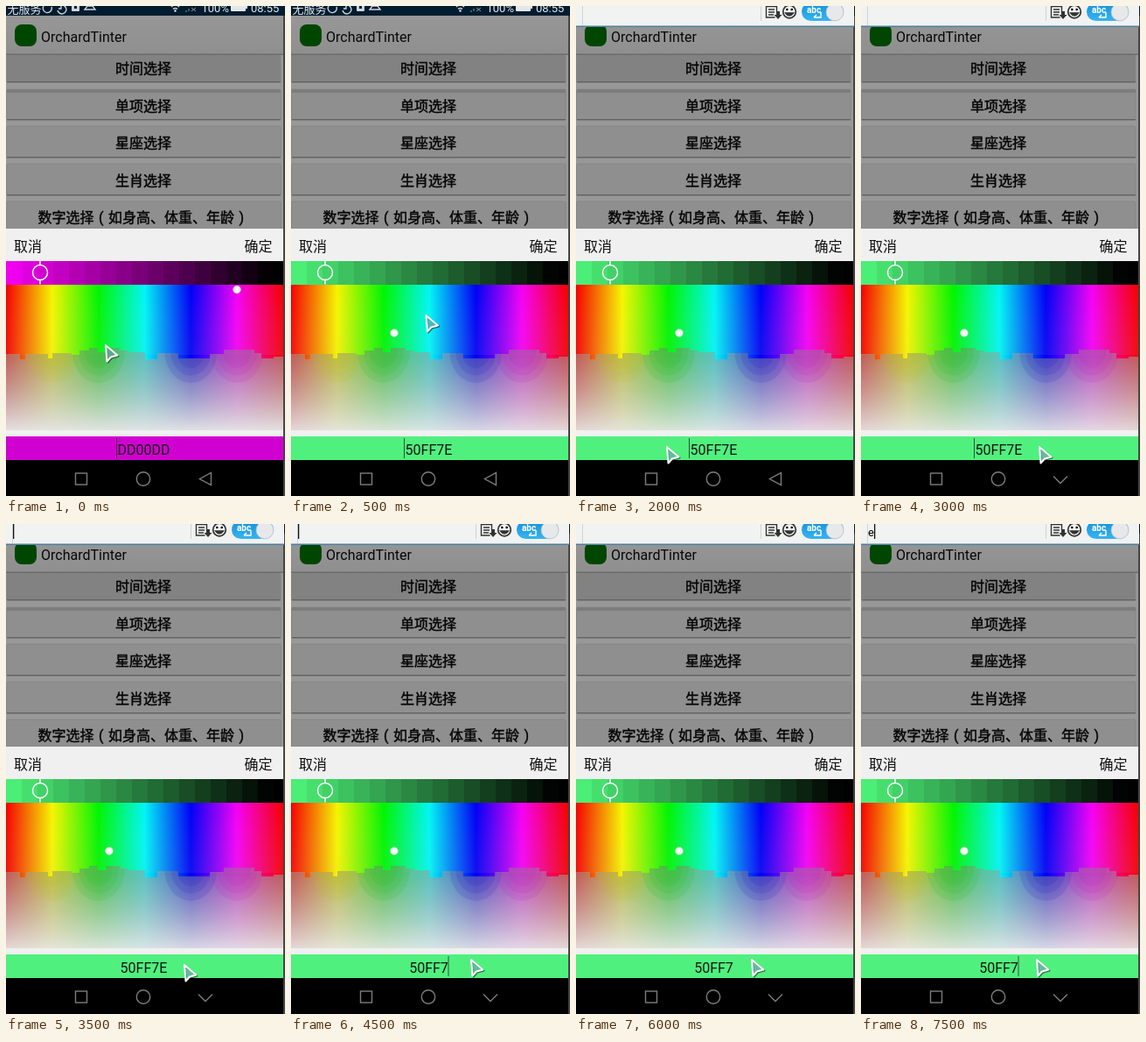
An HTML page that plays this animation: 319 by 559 pixels, repeating every 8 s.

```html
<!DOCTYPE html>
<html lang="zh">
<head>
<meta charset="utf-8">
<title>Colour picker</title>
<style>
  html, body { margin: 0; width: 100%; height: 100%; overflow: hidden; background: #000; }
  svg { display: block; width: 319px; height: 559px; }
  text { font-family: Roboto, "Noto Sans CJK SC", "Noto Sans CJK", sans-serif; font-size: 16px; }
  .mid { text-anchor: middle; }
  .row { fill: #050505; stroke: #050505; stroke-width: .45; }
  .status text { font-size: 13px; fill: #e8edf0; }
  .line { fill: none; stroke-width: 1.4; }
</style>
</head>
<body>
<svg viewBox="0 0 319 559" xmlns="http://www.w3.org/2000/svg">
  <defs>
    <linearGradient id="hue"></linearGradient>
    <linearGradient id="fadeTop" x2="0" y2="1">
      <stop offset="0" stop-color="#fff" stop-opacity="0"/>
      <stop offset="1" stop-color="#ccc" stop-opacity=".08"/>
    </linearGradient>
    <linearGradient id="fadeLow" gradientUnits="userSpaceOnUse" x1="0" x2="0" y1="391" y2="484">
      <stop offset="0" stop-color="#989898" stop-opacity=".56"/>
      <stop offset=".5" stop-color="#bcbcbc" stop-opacity=".77"/>
      <stop offset="1" stop-color="#e4e4e4" stop-opacity=".98"/>
    </linearGradient>
    <clipPath id="low"><path id="lowEdge"/></clipPath>
    <linearGradient id="bar" x2="0" y2="1">
      <stop offset="0" stop-color="#979797"/>
      <stop offset="1" stop-color="#8f8f8f"/>
    </linearGradient>
    <linearGradient id="pill" x2="0" y2="1">
      <stop offset="0" stop-color="#1690d8"/>
      <stop offset="1" stop-color="#38b4f2"/>
    </linearGradient>
  </defs>

  <!-- dimmed page -->
  <rect width="319" height="559" fill="#989898"/>
  <rect y="11" width="317" height="44" fill="url(#bar)"/>
  <rect x="10" y="21" width="25" height="25" rx="8" fill="#004600"/>
  <text x="40" y="40.5" fill="#080808">OrchardTinter</text>
  <g id="rows"></g>
  <rect y="54.5" width="317" height="1.5" fill="#6c6c6c"/>
  <rect x="317" y="11" width="2" height="548" fill="#444"/>

  <!-- status bar -->
  <g class="status">
    <rect width="319" height="11" fill="#021c30"/>
    <text x="1.5" y="7.5">无服务</text>
    <g class="line" stroke="#cfd6da">
      <path d="M43 0a5 5 0 1 0 9 1M59 5a5 5 0 1 0 4-6v4h-3M90 4h12l-3-4h-6z"/>
      <path d="M189 1q4.500-4 9 0M191 3.500q2.500-2 5 0"/>
      <path d="M205 6h2M209 6v-3M212 2l5 4M217 2l-5 4" stroke="#8d989f" stroke-width="1"/>
    </g>
    <rect x="75" y="-4" width="9" height="10" rx="1" fill="#cfd6da"/>
    <rect x="78" y="0" width="3" height="3" fill="#021c30"/>
    <circle cx="193.500" cy="5.500" r="1.200" fill="#e8edf0"/>
    <text x="223.500" y="7">100%</text>
    <rect x="257" y="-4" width="17" height="10" rx="1" fill="#e4e8ea"/>
    <rect x="274" y="-1" width="2" height="4" fill="#e4e8ea"/>
    <text x="280" y="7">08:55</text>
  </g>

  <!-- input bar -->
  <g id="ime">
    <rect width="318" height="24" fill="#f1f2f2"/>
    <rect y="22.500" width="318" height="1.500" fill="#4a80a0"/>
    <path d="M7.500 0v22M211.500 0v17" stroke="#d2d2d2"/>
    <text id="typed" x="8" y="14" style="font-size:13px"></text>
    <rect id="imeCaret" y="0" width="1.300" height="17" fill="#111"/>
    <g class="line" stroke="#333">
      <path d="M217.500 0v13h10M217 .5h12.500v6M220 4h7M220 7h7M220 10h6"/>
      <circle cx="244" cy="6.500" r="7.300" stroke-width="1.700"/>
      <path d="M239.500 8q4.500 6 9 0z" fill="#333"/>
    </g>
    <path d="M229 6h4v4h2.500l-4.500 5-4.500-5h2.500z" fill="#333"/>
    <circle cx="241.300" cy="4" r="1.300"/><circle cx="246.700" cy="4" r="1.300"/>
    <rect x="258" y="-4" width="48" height="21" rx="10.500" fill="url(#pill)"/>
    <text x="264" y="8" fill="#fff" style="font-size:10px;font-weight:700">abc</text>
    <path d="M272 13h8v-6M275 10l-3 3" class="line" stroke="#fff"/>
    <circle cx="296" cy="7" r="10" fill="#e6e8ea" stroke="#b9c2c8" stroke-width=".8"/>
  </g>

  <!-- picker -->
  <rect y="254" width="317" height="264" fill="#f0f0f0"/>
  <text x="9" y="279.500" fill="#111">取消</text>
  <text x="272.500" y="279.500" fill="#111">确定</text>
  <g id="strip"></g>
  <g fill="none" stroke="#fff" stroke-width="1.500">
    <circle cx="39" cy="304" r="8.500"/>
    <path d="M39 291v4.500M39 312.500v5"/>
  </g>
  <rect y="318" width="317" height="166" fill="url(#hue)"/>
  <rect y="318" width="317" height="80" fill="url(#fadeTop)"/>
  <g clip-path="url(#low)">
    <rect id="haze" y="385" width="317" height="99" fill="url(#fadeLow)"/>
    <g id="glows"></g>
  </g>
  <circle id="dot" r="4.300" fill="#fff" fill-opacity=".95" stroke="#ddd" stroke-width=".6"/>
  <rect id="field" y="491" width="317" height="27"/>
  <text id="hex" class="mid" x="157.500" y="511.500" fill="#151515"></text>
  <rect id="caret" y="493" width="1" height="23" fill="#222" fill-opacity=".75"/>

  <!-- navigation -->
  <rect y="518" width="317" height="41" fill="#000"/>
  <g class="line" stroke="#7c7c7c">
    <rect x="79.500" y="533" width="13" height="13"/>
    <circle cx="157" cy="539.500" r="7.700"/>
    <path id="back"/>
  </g>

  <path id="mouse" d="M0 0L1.500 18.500L6 13.500L13.500 11.500Z" fill="#8cc8d7" fill-opacity=".5"
        stroke="#fff" stroke-width="2" stroke-linejoin="round"
        style="filter:drop-shadow(1px 1px .5px #0008)"/>
</svg>

<script>
const $ = id => document.getElementById(id);
const NS = 'http://www.w3.org/2000/svg';
const add = (parent, tag, attrs, text = '') => {
  const el = document.createElementNS(NS, tag);
  set(el, attrs);
  el.textContent = text;
  parent.append(el);
  return el;
};
function set(el, attrs) {
  for (const k in attrs) el.setAttribute(k, attrs[k]);
}
const show = (id, on) => $(id).style.display = on ? '' : 'none';

// list buttons: top, bottom, label baseline, label
[
  [56, 87, 76.5, '时间选择'],
  [95, 130, 119.5, '单项选择'],
  [137, 173, 162, '星座选择'],
  [180, 216, 204.5, '生肖选择'],
  [223, 256, 247, '数字选择\u2004(\u2004如身高、体重、年龄\u2004)\u2004']
].forEach(([top, end, base, label], i) => {
  const rows = $('rows');
  add(rows, 'rect', { x: 0.5, y: top, width: 313.5, height: end - top, rx: 1.5,
    fill: i ? '#8f8f8f' : '#828282', stroke: '#858585', 'stroke-width': 0.8 });
  if (i === 1) add(rows, 'rect', { x: 1, y: 95, width: 313, height: 4, fill: '#7d7d7d' });
  add(rows, 'rect', { x: 1, y: end - 1, width: 313, height: 1.3, fill: '#616161' });
  add(rows, 'text', { x: 157, y: base, class: 'mid row' }, label);
});

for (let i = 0; i <= 6; i++)
  add($('hue'), 'stop', { offset: i / 6, 'stop-color': `hsl(${i * 60} 100% 48%)` });

const BAND = 18;
const bands = Array.from({ length: 18 }, (_, i) => add($('strip'), 'rect', {
  x: i * BAND, y: 291, width: Math.min(BAND, 317 - i * BAND), height: 27, 'shape-rendering': 'crispEdges'
}));

// stepped upper edge of the pale half
const edge = [[0, 397], [16, 403], [22, 397], [48, 402], [53, 396], [75, 398], [84, 393], [95, 390],
  [105, 395], [114, 390], [131, 393], [140, 395], [159, 403], [173, 396], [197, 402], [225, 402],
  [233, 397], [249, 392], [284, 396], [292, 402], [306, 400]];
set($('lowEdge'), { d: 'M0 484' + edge.map(([x, y]) => `H${x}V${y}`).join('') + 'H317V484Z' });

// deeper rings under the pure hues
for (const hue of [60, 120, 240, 300])
  for (const r of [30, 23, 16])
    add($('glows'), 'ellipse', { cx: hue / 360 * 317, cy: 394, rx: r, ry: r * 1.2,
      fill: `hsl(${hue} 75% 42%)`, 'fill-opacity': 0.13 });

const magenta = { base: [255, 0, 255], field: '#d000d0', dot: [264, 323.5], haze: 1 };
const green = { base: [80, 255, 126], field: '#50f07e', dot: [118, 373], haze: 0.96 };

// one entry per half second: mouse x, mouse y, hex text, field caret x (0 = hidden), input caret
const STEP = 500;
const steps = [
  [114, 387, 'DD00DD', 126, 0],
  [154.5, 353, '50FF7E', 129, 0],
  [144, 474, '50FF7E', 0, 0],
  [81, 503, '50FF7E', 129, 0],
  [104, 503, '50FF7E', 129, 0],
  [104, 503, '50FF7E', 0, 1],
  [204, 503, '50FF7E', 129, 0],
  [204, 503, '50FF7E', 0, 1],
  [206, 497, '50FF7E', 186, 0],
  [206, 497, '50FF7', 179.5, 1],
  [201, 497, '50FF7', 0, 0],
  [201, 497, '50FF7', 179.5, 1],
  [201, 497, '50FF7', 0, 0],
  [201, 497, '50FF7', 179.5, 0],
  [201, 497, '50FF7', 0, 0],
  [201, 497, '50FF7', 179.5, 1]
];
const IME_AT = 4, KEYBOARD_AT = 5, LETTER_AT = 15;

function draw(n) {
  const [mx, my, hex, caret, imeCaret] = steps[n];
  const look = n ? green : magenta;
  bands.forEach((band, i) => {
    const k = 0.95 * Math.max(0, 1 - (i + 0.3) / 16.6);
    band.setAttribute('fill', `rgb(${look.base.map(c => Math.round(c * k))})`);
  });
  set($('field'), { fill: look.field });
  set($('dot'), { cx: look.dot[0], cy: look.dot[1] });
  set($('haze'), { opacity: look.haze });
  $('hex').textContent = hex;
  show('caret', caret);
  set($('caret'), { x: caret });
  show('ime', n >= IME_AT);
  const letter = n >= LETTER_AT;
  $('typed').textContent = letter ? 'e' : '';
  show('imeCaret', imeCaret);
  set($('imeCaret'), { x: letter ? 15 : 8 });
  set($('back'), { d: n >= KEYBOARD_AT ? 'M220 536.500L228 544.500L236 536.500' : 'M234.500 532.500V546.500L221.500 539.500Z' });
  set($('mouse'), { transform: `translate(${mx} ${my})` });
}

let last = -1;
function tick(now) {
  const n = Math.floor(now / STEP) % steps.length;
  if (n !== last) draw(last = n);
  requestAnimationFrame(tick);
}
draw(0);
requestAnimationFrame(tick);
</script>
</body>
</html>
```
